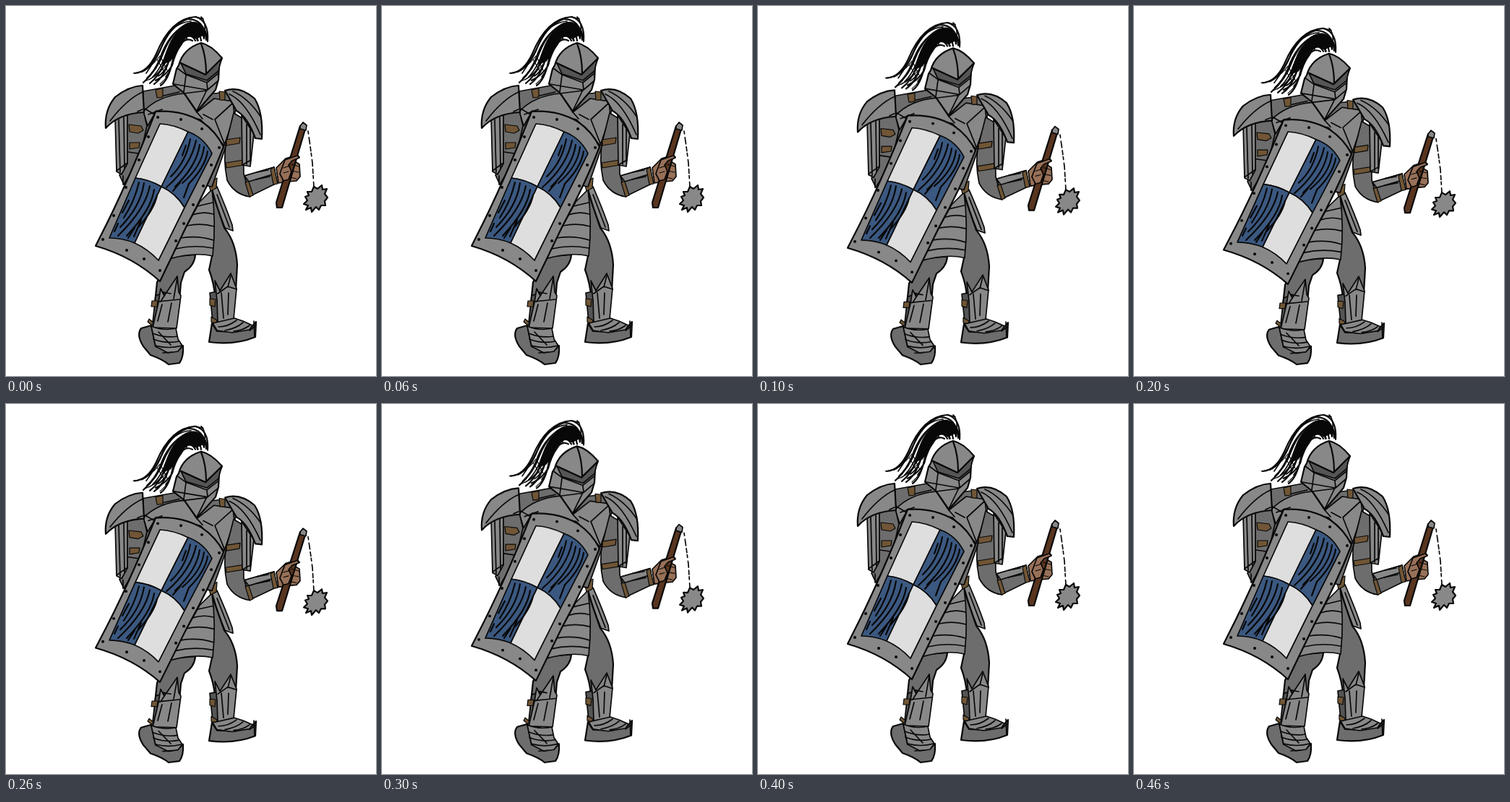
Recreate the animation shown at these times as an HTML page without scripts. Size 512 px wide and 512 px high, loop 500 ms.

```html
<!DOCTYPE html>
<html lang="en">
<head>
<meta charset="utf-8">
<title>Idle knight</title>
<style>
  html, body { margin: 0; width: 100%; height: 100%; overflow: hidden; background: #fff; }
  svg { display: block; width: 100%; height: 100%; }
  path { stroke: #080808; stroke-width: 1.7; stroke-linejoin: round; stroke-linecap: round; fill: none; }
  .plate { fill: #888; }
  .mail { fill: #6d6d6d; }
  .shade { fill: #555; }
  .strap { fill: #705636; stroke-width: 1.2; }
  .skin { fill: #987158; }
  .wood { fill: #59351f; }
  .white { fill: #dedede; }
  .blue { fill: #3b5880; }
  .bold { stroke-width: 2.2; }
  .thin { stroke-width: 1.1; }
  .rivets { stroke-width: 4; }
  .knight { transform-origin: 0 497px; animation: breathe 500ms step-end infinite; }
  @keyframes breathe {
    0%, 80%, 100% { transform: scaleY(1); }
    20%, 60% { transform: scaleY(.9834); }
    40% { transform: scaleY(.967); }
  }
</style>
</head>
<body>
<svg viewBox="0 0 512 512">
  <g class="knight">
    <g id="plume">
      <path class="bold" d="M279 49Q281 20 262 15Q228 17 208 66Q196 92 178 93M277 47Q275 17 249 18Q226 29 213 62Q203 84 188 91"/>
      <path class="bold" d="M278 44Q276 23 252 24Q230 34 218 64Q210 88 190 106M274 45Q271 25 247 27Q224 40 213 73Q206 90 195 100"/>
      <path class="bold" d="M270 48Q267 28 250 31Q230 45 219 78Q212 97 199 107M265 48Q263 34 248 37Q233 49 225 77Q218 99 205 108"/>
      <path class="bold" d="M262 48Q257 38 247 43Q233 58 230 78Q225 102 214 110M258 48Q249 43 242 53Q233 68 230 82Q222 96 207 103"/>
      <path d="M256 21Q232 23 219 48Q207 75 194 93M268 25Q240 22 226 54Q216 85 203 98M258 30Q237 39 228 66Q224 88 211 97M251 38Q237 48 233 67Q231 86 221 98M263 15L273 18 270 15Q278 23 274 44M258 25L266 48M249 25L250 46"/>
      <path class="thin" d="M176 93Q197 91 213 69M190 105Q211 98 224 73M198 102Q213 95 227 75M213 108Q226 97 229 83M217 51Q229 27 253 18M214 70L223 89M209 74L219 91"/>
      <path style="fill:#080808" d="M255 23Q270 20 275 39L263 45Q251 35 243 53L227 76 217 80Q228 37 255 23Z"/>
    </g>

    <g id="legs">
      <path class="mail bold" d="M228 347L262 344Q261 359 247 368L242 383 240 407 206 411 209 382Z"/>
      <path class="mail bold" d="M286 260L302 307Q318 326 320 358L318 393 289 401Q288 384 281 365L285 346Z"/>
      <path class="shade" d="M207 401L203 438 211 443 219 396ZM282 397L286 437 294 439 293 395Z"/>
      <path class="plate" d="M214 391L219 401 237 374 239 396 242 401 236 446 203 445 211 410Z"/>
      <path class="plate" d="M289 380L296 394 311 370 319 391 315 433 293 438 292 407Z"/>
      <path d="M211 409L240 406M219 401L214 409M237 376L232 405M229 411L224 437M216 413L210 436M293 398L307 388 319 392M311 373L307 389M298 397L301 432M308 397L307 427M217 396L228 398"/>
      <path class="strap" d="M202 408L210 408 209 416 201 416ZM198 433L204 438 202 442 196 437ZM282 405L290 406 289 416 282 414ZM284 430L292 435 291 440 284 437Z"/>
      <path class="mail bold" d="M201 442L187 446Q180 455 190 471L200 483Q217 489 225 496L240 494Q246 486 245 470L238 477 207 471Z"/>
      <path class="plate" d="M201 443Q218 450 235 446L238 461 244 470 238 478 224 480 207 471Z"/>
      <path d="M203 453Q221 460 237 457M204 461Q222 468 240 464M207 470Q225 475 243 470M211 451L228 469M217 480L230 479"/>
      <path class="mail bold" d="M285 439L281 465Q316 470 345 458L346 437 340 444 317 451 292 450Z"/>
      <path class="plate" d="M286 439L316 432 328 436 341 442 337 448 313 452 292 449Z"/>
      <path d="M294 444Q307 444 319 435M303 449Q319 446 328 438M315 450Q328 449 337 442M337 449L345 443M343 436L344 458"/>
    </g>

    <g id="skirt">
      <path class="plate" d="M268 271L285 254Q291 298 286 346Q261 340 226 350L242 319Z"/>
      <path d="M258 289Q273 284 287 288M251 304Q270 300 288 305M242 321Q266 317 287 324M235 336Q260 330 286 335M265 277L286 272"/>
      <path class="plate" d="M285 253L292 250Q305 280 313 303L314 311 303 307Q293 282 285 253Z"/>
      <path d="M292 261L309 306"/>
      <path class="strap" d="M280 244L292 238 291 252 283 256Z"/>
    </g>

    <g id="torso">
      <path class="mail" d="M190 118L234 110 255 125 305 119 322 129 303 198 285 250 180 232Z"/>
      <path class="plate" d="M190 146Q211 124 247 121L264 147 288 128 314 132 316 151 302 193 269 157 208 145 196 166Z"/>
      <path d="M192 142L207 151M264 147L272 156M313 135L289 157 302 190M286 157L273 150M210 126L240 119M197 150L216 143"/>
      <path class="strap" d="M207 116L217 114 217 126 209 127ZM295 118L303 119 303 130 296 130Z"/>
    </g>

    <g id="left-arm">
      <path class="mail" d="M167 148L190 145 195 166 185 210 163 247 157 234 168 216Z"/>
      <path class="strap" d="M170 164L187 166 190 172 183 176 171 174ZM171 189L185 189 184 196 171 198Z"/>
      <path class="plate" d="M151 154L153 229 160 233 168 218 168 148Z"/>
      <path d="M156 157L158 230M163 153L164 224M153 228L168 217M169 202L183 204M162 235L162 247"/>
      <path class="plate bold" d="M189 110Q170 111 151 126Q136 144 138 169Q156 149 191 147Z"/>
      <path d="M189 119Q167 129 144 159M189 143L182 146"/>
    </g>

    <g id="right-arm">
      <path class="mail" d="M315 148L328 156 329 232 338 264Q316 261 306 241Q300 211 305 188Z"/>
      <path class="strap" d="M305 185L324 182 323 190 305 193ZM304 217L329 213 329 220 305 224Z"/>
      <path class="plate" d="M326 151L327 220 338 222 343 177Z"/>
      <path d="M333 164L333 219M338 171L338 216M327 220L339 213"/>
      <path class="plate bold" d="M303 117Q324 110 344 128Q356 147 354 184L345 183Q334 153 319 145Z"/>
      <path d="M309 122Q332 132 352 178M314 118Q336 128 353 154"/>
      <path class="mail" d="M330 235L371 223 375 245 338 263Z"/>
      <path class="plate" d="M330 235L371 223 372 232 336 243Z"/>
      <path d="M346 240L365 236M347 230L363 227"/>
      <path class="strap" d="M331 244L336 243 342 262 337 264ZM366 226L371 223 376 246 370 247Z"/>
    </g>

    <g id="flail">
      <path class="skin" d="M374 224L387 211 403 206 406 209 398 214 406 219 407 236 402 242 391 243 377 245Z"/>
      <path class="wood bold" d="M407 166L415 167 382 279 375 279 374 272Z"/>
      <path class="plate" d="M407 166L411 161 416 165 415 172 407 170Z"/>
      <path class="skin" d="M386 213L403 207 406 210 396 214 391 220 395 229 391 240 384 242 379 232Z"/>
      <path class="thin" d="M395 219L405 222M394 228L405 230M393 237L402 239M384 224L393 221M384 231L391 229"/>
      <path stroke-dasharray="4 5 9 4 6 3" d="M418 173L421 194 424 217 426 250"/>
      <path class="plate bold" d="M426 250L431 253 437 248 438 254 444 253 441 260 445 265 441 270 442 276 436 276 433 282 429 278 423 285 422 279 415 282 418 276 412 274 417 269 414 264 419 262 417 257 423 257Z"/>
    </g>

    <g id="helmet">
      <path class="plate bold" d="M270 51Q245 59 239 82L236 87 231 108 246 120 264 146 290 116 294 102 295 82 299 72Q284 54 270 51Z"/>
      <path class="shade" d="M242 79L276 95 298 73 294 90 278 103 249 94Z"/>
      <path class="bold" d="M270 52Q277 70 277 94M242 79L276 95 298 73"/>
      <path d="M237 86L249 95 278 106 294 93M232 108L278 116 264 145M249 96L246 119M278 107L279 116 293 104M247 121L278 117"/>
    </g>

    <g id="shield">
      <path class="plate bold" d="M207 146Q242 143 271 160Q291 174 301 195Q280 249 250 304L213 381Q176 347 124 332L131 318Q168 246 207 146Z"/>
      <path class="white" d="M213 163Q232 164 252 174L215 250Q198 240 179 238Z"/>
      <path class="blue" d="M252 174Q274 182 285 204L247 279Q235 259 215 250Z"/>
      <path class="blue" d="M179 238Q198 240 215 250L178 328Q161 321 143 321Z"/>
      <path class="white" d="M215 250Q235 259 247 279L211 352Q196 336 178 328Z"/>
      <path class="bold" d="M255 184Q249 216 228 236M263 186Q256 221 222 251M268 192Q264 221 234 250M274 195Q271 222 244 245M279 201Q276 222 253 246M253 246L246 265M249 193L244 207M241 244L231 256"/>
      <path class="bold" d="M184 244Q178 270 163 293M191 245Q186 278 158 306M199 249Q193 281 155 318M205 254Q201 282 167 318M209 262Q205 282 183 306M178 307L169 321M170 269L161 286M187 296L177 319M155 301L150 312"/>
      <path class="rivets" d="M210 154h.1M242 157h.1M271 170h.1M295 196h.1M284 220h.1M273 249h.1M259 275h.1M246 301h.1M235 325h.1M213 366h.1M191 350h.1M167 338h.1M134 323h.1M149 290h.1M166 251h.1M184 213h.1M197 181h.1"/>
    </g>
  </g>
</svg>
</body>
</html>
```
